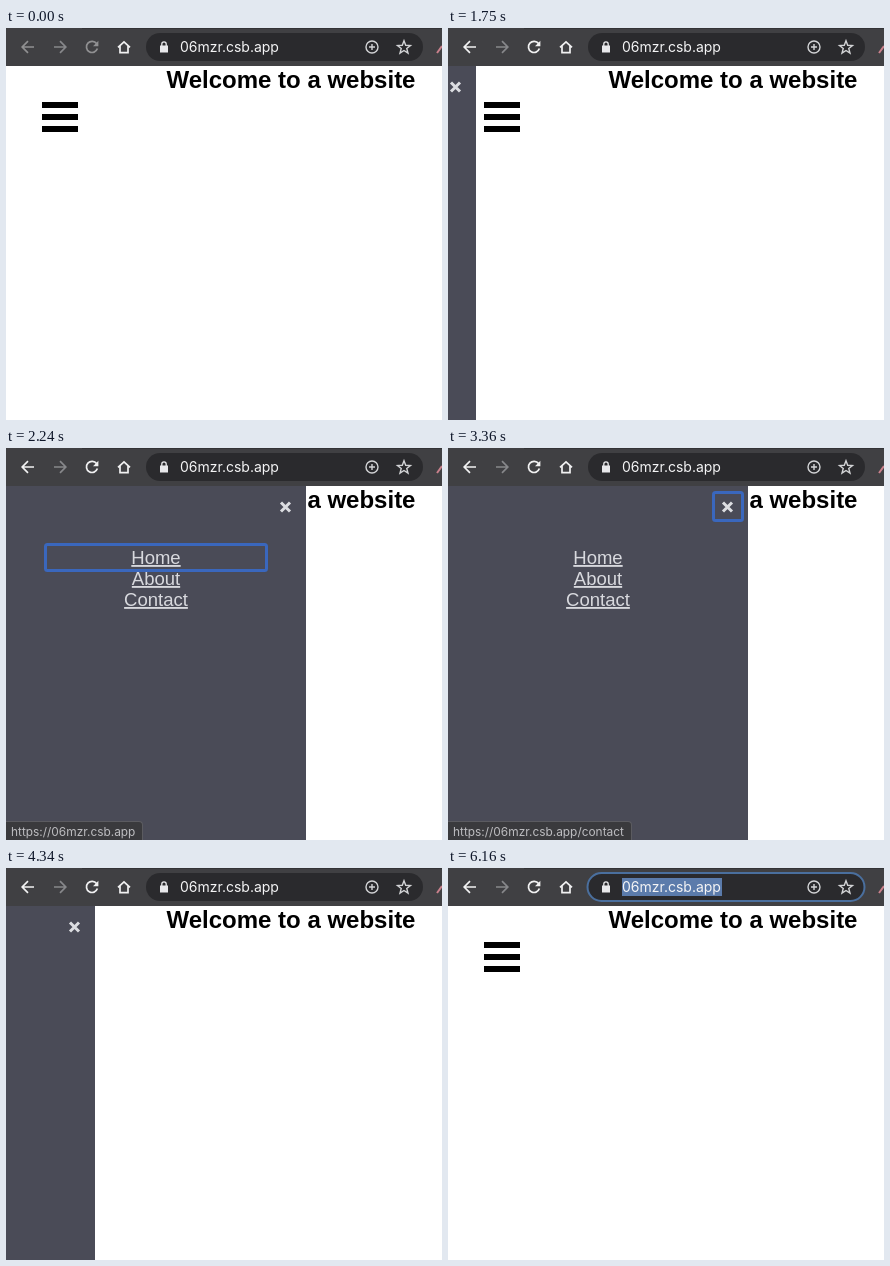
Write an HTML page that moves like this. It is 436 px wide and 392 px high and loops after 6510 ms.

```html
<!DOCTYPE html>
<html lang="en">
<head>
<meta charset="utf-8">
<title>Side menu</title>
<style>
  html, body { margin: 0; width: 100%; height: 100%; overflow: hidden; background: #fff; }
  #stage { position: relative; width: 436px; height: 392px; overflow: hidden; }
  svg { display: block; }
  .heading { font: bold 24px "Liberation Sans", Arial, sans-serif; }
  .links { font: 18.5px "Liberation Sans", Arial, sans-serif; fill: #d8d9de; text-anchor: middle; text-decoration: underline; }
  .url { font: 14px Inter, sans-serif; fill: #f4f4f5; }
  .icon { fill: none; stroke: #f1f1f2; stroke-width: 1.7; }
  .thin { stroke: #d3d4d6; stroke-width: 1.4; }
  .ring { fill: none; stroke: #3a67bd; stroke-width: 3; visibility: hidden; }
  #status {
    position: absolute; left: 0; top: 373px; height: 19px; box-sizing: border-box;
    padding: 0 7px 0 5px; border: solid #5b5b60; border-width: 1px 1px 0 0;
    border-radius: 0 4px 0 0; background: #3a3a3d; color: #bdbdc0;
    font: 11.9px/20px Inter, sans-serif; white-space: nowrap;
  }
</style>
</head>
<body>
<div id="stage">
  <svg width="436" height="392" viewBox="0 0 436 392">
    <rect width="436" height="392" fill="#fff"/>
    <text class="heading" x="160.5" y="60">Welcome to a website</text>
    <path d="M36 77h36M36 89h36M36 101h36" stroke="#000" stroke-width="6"/>
    <rect class="ring" data-ring="menu" x="33" y="71" width="42" height="36" rx="3"/>

    <g id="panel">
      <rect y="38" width="300" height="354" fill="#4a4b57"/>
      <g class="links">
        <text x="150" y="116">Home</text>
        <text x="150" y="137">About</text>
        <text x="150" y="158">Contact</text>
      </g>
      <path d="M275 54.5l9 9m0-9l-9 9" stroke="#dcdde1" stroke-width="3"/>
      <rect class="ring" data-ring="home" x="39.5" y="96.5" width="221" height="26" rx="2"/>
      <rect class="ring" data-ring="about" x="39.5" y="117.5" width="221" height="26" rx="2"/>
      <rect class="ring" data-ring="contact" x="39.5" y="138.5" width="221" height="26" rx="2"/>
      <rect class="ring" data-ring="close" x="265.5" y="44.5" width="29" height="28" rx="2"/>
    </g>

    <rect width="436" height="38" fill="#404043"/>
    <path d="M76 .5h360" stroke="#2c2c2f" opacity=".6"/>
    <g class="icon">
      <path id="back" d="M28 19H16.5M22 13.2L16.2 19l5.8 5.8"/>
      <path d="M48 19h11.5M54 13.2l5.8 5.8-5.8 5.8" stroke="#87888b"/>
      <g id="reload">
        <path d="M90.6 15.6A5.6 5.6 0 1 0 91.4 20.6"/>
        <path d="M92.4 12.8v5.4H87z" fill="#f1f1f2" stroke="none"/>
      </g>
      <path d="M112 19.4l6-5.6 6 5.6M114 18v6.6h8V18"/>
    </g>
    <rect x="140" y="5" width="277" height="28" rx="14" fill="#2a2a2d"/>
    <rect class="ring" data-ring="url" x="139.5" y="5" width="277" height="28" rx="14" style="stroke:#4a6f9e;stroke-width:2"/>
    <path d="M154 17.5h8v7h-8z" fill="#e8e8ea"/>
    <path d="M155.8 18v-2a2.2 2.2 0 0 1 4.4 0v2" fill="none" stroke="#e8e8ea" stroke-width="1.3"/>
    <rect class="ring" data-ring="url" x="174" y="10" width="100" height="18" style="fill:#5b7bab;stroke:none"/>
    <text class="url" x="174" y="24">06mzr.csb.app</text>
    <g class="icon thin">
      <circle cx="366" cy="19" r="6"/>
      <path d="M363 19h6M366 16v6"/>
      <path id="star"/>
    </g>
    <path d="M431 25l5-7" stroke="#c9808c" stroke-width="2"/>
  </svg>
  <div id="status"></div>
</div>
<script>
const LOOP = 6510, TICK = 70, SLIDE = 500, WIDTH = 300;
const OPEN_AT = 1700, CLOSE_AT = 4133;
const FADE_ICONS = 140, FADE_STATUS = 3570;

const focusSteps = [
  [0, ''], [560, 'menu'], [1750, ''], [2240, 'home'], [2450, 'about'], [2660, 'contact'],
  [3360, 'close'], [4130, ''], [5040, 'menu'], [5390, ''], [6160, 'url']
];
const statusSteps = [[0, ''], [2240, '/'], [2450, '/about'], [2660, '/contact'], [3850, '']];

const byId = id => document.getElementById(id);
const [panel, status, back, reload] = ['panel', 'status', 'back', 'reload'].map(byId);
const rings = document.querySelectorAll('.ring');
const clamp = v => Math.min(1, Math.max(0, v));
const stepAt = (steps, t) => steps.filter(([at]) => at <= t).pop()[1];

// CSS "ease": cubic-bezier(.25, .1, .25, 1)
function ease(x) {
  if (x <= 0 || x >= 1) return clamp(x);
  let lo = 0, hi = 1;
  for (let i = 0; i < 24; i++) {
    const s = (lo + hi) / 2;
    if (.75 * s * (1 - s) + s ** 3 < x) lo = s; else hi = s;
  }
  return .3 * lo * (1 - lo) ** 2 + 3 * lo * lo * (1 - lo) + lo ** 3;
}

function starPath(cx, cy, outer, inner) {
  const points = Array.from({ length: 10 }, (_, i) => {
    const r = i % 2 ? inner : outer, a = i * Math.PI / 5 - Math.PI / 2;
    return (cx + r * Math.cos(a)).toFixed(2) + ' ' + (cy + r * Math.sin(a)).toFixed(2);
  });
  return 'M' + points.join('L') + 'Z';
}
byId('star').setAttribute('d', starPath(398, 19.6, 6.8, 2.9));

function render(t) {
  const shown = ease((t - OPEN_AT) / SLIDE) - ease((t - CLOSE_AT) / SLIDE);
  panel.setAttribute('transform', `translate(${Math.round((shown - 1) * WIDTH)} 0)`);

  const focus = stepAt(focusSteps, t);
  for (const ring of rings) ring.style.visibility = ring.dataset.ring === focus ? 'visible' : 'hidden';

  const path = stepAt(statusSteps, t);
  status.style.display = path ? 'block' : 'none';
  status.textContent = 'https://06mzr.csb.app' + (path === '/' ? '' : path);
  status.style.opacity = 1 - clamp((t - FADE_STATUS) / 280);

  back.style.opacity = reload.style.opacity = .45 + .55 * clamp(t / FADE_ICONS);
}

function frame() {
  const t = performance.now() % LOOP;
  render(Math.floor(t / TICK) * TICK);
  requestAnimationFrame(frame);
}
frame();
</script>
</body>
</html>
```
